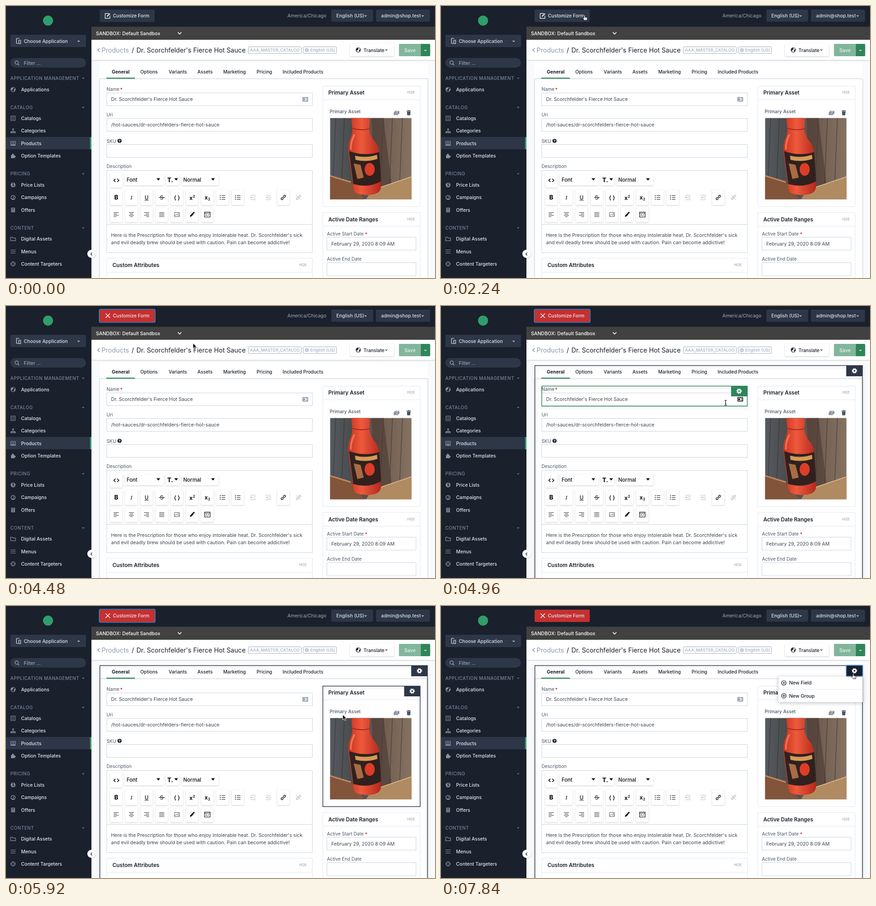
An HTML page that plays this animation: 939 by 596 pixels, repeating every 8 s.

```html
<!DOCTYPE html>
<html lang="en">
<head>
<meta charset="utf-8">
<title>Customize form</title>
<style>
html, body { margin: 0; width: 100%; height: 100%; overflow: hidden; background: #fff; }
svg { display: block; width: 939px; height: 596px; font-family: Inter, sans-serif; }
text { white-space: pre; }
.lift { filter: drop-shadow(0 1px 1.5px rgba(0,0,0,.2)); }
.float { filter: drop-shadow(0 2px 4px rgba(0,0,0,.22)); }
</style>
</head>
<body>
<svg id="stage" viewBox="0 0 939 596" xmlns="http://www.w3.org/2000/svg"></svg>
<script>
const NAVY = '#1a202c', SLATE = '#2d3748', GREEN = '#2f855a', INK = '#1a202c';
const BODY = '#3d4451', LABEL = '#4a5568', EDGE = '#cbd5e0', FAINT = '#e2e8f0', PALE = '#a0aec0';
const PRODUCT = "Dr. Scorchfelder's Fierce Hot Sauce";

const text = (x, y, s, size, fill, weight = 400, extra = '') =>
  `<text x="${x}" y="${y}" font-size="${size}" fill="${fill}" font-weight="${weight}" ${extra}>${s}</text>`;
const rect = (x, y, w, h, fill, extra = '') =>
  `<rect x="${x}" y="${y}" width="${w}" height="${h}" fill="${fill}" ${extra}/>`;
const box = (x, y, w, h, stroke, extra = '') => rect(x, y, w, h, '#fff', `stroke="${stroke}" ${extra}`);
const line = (d, stroke, w = 1, extra = '') =>
  `<path d="${d}" fill="none" stroke="${stroke}" stroke-width="${w}" ${extra}/>`;
const shape = (d, fill, extra = '') => `<path d="${d}" fill="${fill}" ${extra}/>`;
const ring = (x, y, r, stroke, w = 1, extra = '') =>
  `<circle cx="${x}" cy="${y}" r="${r}" fill="none" stroke="${stroke}" stroke-width="${w}" ${extra}/>`;
const dot = (x, y, r, fill, extra = '') => `<circle cx="${x}" cy="${y}" r="${r}" fill="${fill}" ${extra}/>`;
const at = (x, y, s) => `<g transform="translate(${x} ${y})">${s}</g>`;
const group = (id, s) => `<g id="${id}">${s}</g>`;
const chevron = (x, y, c, r = 2.2, w = 1.2) => line(`M${x - r} ${y - r / 2}l${r} ${r}l${r} ${-r}`, c, w);
const caret = (x, y) => shape(`M${x - 4} ${y - 2.5}h8l-4 5z`, '#000');
const hide = (x, y) => text(x, y, 'HIDE', 7, '#8a94a6', 400, 'letter-spacing=".15"');
const gear = (x, y, c = '#fff') => at(x, y, ring(0, 0, 3.2, c, 2.6) + ring(0, 0, 4.9, c, 1.9, 'stroke-dasharray="2 1.85"'));
const globe = (x, y, r, c) => at(x, y, ring(0, 0, r, c, 1.1) +
  shape(`M${-r} -1l${r * .6} ${-r * .7}l${r * .6} ${r * .3}l${-r * .3} ${r * .5}l${-r * .4} ${r * .3}l${r * .2} ${r * .7}z
    M${r * .3} ${r * .1}l${r * .6} ${-r * .5}v${r * .6}l${-r * .5} ${r * .6}z`, c));

const icons = c => ({
  globe: globe(0, 0, 5, c),
  book: line('M-4.5 -5h9v10h-9zM-2 -2.5h4M-2 0h4M-2 2.5h4', c, 1.2) + line('M-4.5 -3h-1M-4.5 3h-1', c),
  tree: line('M0 -2v3M-4 3v-2h8v2', c) + rect(-1.7, -5, 3.4, 3, c) +
    [-5.5, -1.5, 2.5].map(x => rect(x, 2, 3, 3, c)).join(''),
  list: line('M-5 -4.5h10v9h-10z', c, 1.2) + line('M-3 -2h6M-3 0h6', c) + rect(-4, 2, 8, 2, c),
  puzzle: rect(-4.5, -2, 8, 7, c) + dot(-.5, -3, 2, c) + dot(4, 1.5, 1.8, c),
  price: dot(0, 0, 5.2, c) + text(-2.6, 3.2, '$', 8.5, NAVY, 700),
  gauge: ring(0, 0, 4.6, c, 1.5) + line('M-.5 1l2.5 -3M-3 3.3h6', c, 1.4),
  calc: rect(-4, -5, 8, 10, c) + line('M-2.5 -2.8h5', NAVY, 1.5) + line('M-2.5 .2h5M-2.5 2.8h5', NAVY, 1.2, 'stroke-dasharray="1.2 .7"'),
  folder: line('M-5.3 -3.8h3.8l1.5 1.6h5.3v6h-10.6z', c, 1.2),
  menu: line('M-5.5 -3.5h11M-5.5 0h11M-5.5 3.5h11', c, 1.1),
  target: ring(0, 0, 4.6, c, 1.2) + line('M0 -5v3.5M0 5v-3.5M-5 0h3.5M5 0h-3.5', c, 1.3)
});

function sidebar() {
  const sections = [['APPLICATION MANAGEMENT', 158], ['CATALOG', 222], ['PRICING', 367.5], ['CONTENT', 486]];
  const rows = [['Applications', 183, 'globe'], ['Catalogs', 246, 'book'], ['Categories', 273.5, 'tree'],
    ['Products', 301, 'list'], ['Option Templates', 328.5, 'puzzle'], ['Price Lists', 392, 'price'],
    ['Campaigns', 419.5, 'gauge'], ['Offers', 447, 'calc'], ['Digital Assets', 510.5, 'folder'],
    ['Menus', 538, 'menu'], ['Content Targeters', 565, 'target']];
  const set = icons('#8592a6');
  return rect(0, 0, 187, 596, NAVY) + dot(92, 32, 11, '#2f9e6b') +
    rect(9.5, 63, 165.5, 27, SLATE, 'rx="2"') +
    line('M29 71h-6v11h4', '#e2e8f0', 1.2) + line('M28 75h4v7.500h-4z', '#e2e8f0', 1.2) +
    text(39, 80.6, 'Choose Application', 10.3, '#dbe2ea', 500) + chevron(159, 77, '#e2e8f0') +
    rect(9.5, 114, 165.5, 21, SLATE, 'rx="10.5"') + ring(23.3, 124, 3.7, PALE, 1.2) + line('M26 127l3 3', PALE, 1.3) +
    text(39, 128.5, 'Filter ...', 10.5, '#a9b5c5') +
    rect(0, 287, 187, 27, SLATE) + rect(184, 287, 3, 27, '#38a169') +
    sections.map(([s, y]) => text(9.5, y + 3.8, s, 9.85, '#76859a', 500, 'letter-spacing=".5"') + chevron(169, y, '#76859a')).join('') +
    rows.map(([s, y, k]) => at(15.5, y, set[k]) + text(33, y + 3.8, s, 10.4, '#e2e8f0', 500)).join('');
}

function topBar() {
  return rect(187, 0, 752, 45, NAVY) +
    text(616, 25, 'America/Chicago', 10.4, '#a0abbb') +
    rect(712, 8, 91.500, 26.500, SLATE, 'rx="2"') + text(723, 25, 'English (US)', 10.45, '#dbe2ea', 500) + chevron(787, 21.500, '#e2e8f0') +
    rect(810, 8, 118, 26.500, SLATE, 'rx="2"') + text(821, 25, 'admin@shop.test', 10.4, '#dbe2ea', 500) + chevron(912, 21.500, '#e2e8f0') +
    rect(187, 45, 752, 29, '#414141') + rect(187, 45, 752, 1, '#333') +
    text(197, 63.600, 'SANDBOX: Default Sandbox', 10.5, '#fff', 500) + chevron(380, 59.500, '#fff', 4, 1.7);
}

function titleBar() {
  return rect(187, 74, 752, 44, '#fff', 'class="lift"') +
    line('M205 92.500l-4 4l4 4', '#8794a8', 1.6) + text(209, 101.5, 'Products', 14.3, '#8e9bb0') +
    text(275, 101.5, '/', 14.2, INK) + text(285.5, 101.5, PRODUCT, 14.15, INK, 400) +
    box(530.5, 89.500, 116, 14.500, PALE, 'rx="2"') + text(534, 100.2, 'AAA_MASTER_CATALOG', 9.15, PALE, 500) +
    box(650.5, 89.500, 73, 14.500, PALE, 'rx="2"') + ring(658.5, 96.700, 3.8, PALE) +
    line('M655 96.700h7M658.500 93v7.500M657 93.500q-1.500 3 0 6.500M660 93.500q1.500 3 0 6.500', PALE, .7) +
    text(666, 100.2, 'English (US)', 9.3, PALE, 500) +
    rect(753, 83, 96, 27, '#fff', 'rx="2" class="lift"') + globe(771, 96.300, 5, INK) +
    text(782.5, 100.5, 'Translate', 10.4, INK, 500) + chevron(832.500, 96.300, INK) +
    rect(860.5, 83, 68, 27, GREEN, 'rx="2"') + rect(860.5, 83, 47.500, 27, '#82b69c') +
    text(872, 100.600, 'Save', 10.5, '#e6f2eb', 500) + chevron(918, 97, '#fff');
}

const field = (x, y, w, h, s = '') => box(x, y, w, h, EDGE) + text(x + 9.5, y + h / 2 + 3.8, s, 10.6, BODY);
const tool = (x, y, w, h) => rect(x, y, w, h, '#fff', 'rx="1" class="lift"');

function lines(widths, shift) {
  return line(widths.map((w, i) => `M${shift(w)} ${-4.5 + i * 3}h${w}`).join(''), '#333', 1.1);
}

function toolbar() {
  const K = '#111', G = '#b9bec6';
  const bullets = c => line('M-2 -4h8M-2 0h8M-2 4h8', c, 1.1);
  const indent = d => line('M-6 -5h12M0 -1.700h6M0 1.700h6M-6 5h12', G, 1.1) + shape(`M${-3 - d * 2} -2.500v5l${d * 4} -2.500z`, G);
  const chain = c => `<g transform="rotate(-45)">` + line('M-1 -2h-3a2 2 0 0 0 0 4h3M1 -2h3a2 2 0 0 1 0 4h-3M-2.500 0h5', c, 1.3) + '</g>';
  const mid = (s, size, weight = 400, extra = '') => text(0, 4.5, s, size, K, weight, 'text-anchor="middle" ' + extra);
  const row2 = [
    mid('B', 13, 800), mid('I', 13, 500, 'font-style="italic" font-family="Liberation Serif, serif"'),
    mid('U', 11.5, 500) + line('M-4.500 6h9', K), mid('S', 12) + line('M-6 0h12', K, 1.2),
    mid('{ }', 11.5, 600), text(-6, 5, 'x', 12, K, 700) + text(1.5, 0, '2', 7.5, K, 700),
    text(-6, 4, 'x', 12, K, 700) + text(1.5, 6, '2', 7.5, K, 700),
    bullets(K) + [-4, 0, 4].map(y => dot(-5, y, 1, K)).join(''),
    bullets(K) + line('M-5 -5.500v3M-5 -1.500v3M-5 2.500v3', K),
    indent(1), indent(-1), chain(K), chain(G) + line('M-5 -5l10 10', G)
  ];
  const row3 = [
    lines([11, 7, 11, 6], () => -5.5), lines([11, 7, 11, 6], w => -w / 2), lines([11, 7, 11, 6], w => 5.5 - w),
    lines([11, 11, 11, 11], () => -5.5),
    line('M-5.500 -4.500h11v9h-11zM-5 3l3.500 -4l2.500 3l2 -2l2.500 3', '#555') + dot(2.5, -2, 1, '#555'),
    shape('M-5 5l1 -3.500l4 -4l2.500 2.500l-4 4z', K) + line('M1 -1.500l3 -3', K, 3, 'stroke-linecap="round"'),
    line('M-6 -5.500h12v11h-12zM-6 -3h12', K, 1.2) + line('M-3.500 3l2 -4M-1 3h1.500M1.500 2.500l1.500 -3', K)
  ];
  const key = (s, i, y) => {
    const x = 241.2 + i * 33.25, off = [9, 10, 12].includes(i) && y < 430;
    return (off ? '' : tool(x - 13.5, y - 16.5, 27, 33)) + at(x, y, s);
  };
  return box(220.5, 360.5, 450, 180, EDGE) + line('M220 478.500h450', EDGE) +
    tool(228, 366, 27, 32) + line('M239.500 378.500l-3.500 3.500l3.500 3.500M243.500 378.500l3.500 3.500l-3.500 3.500', K, 1.7) +
    tool(260, 369, 85, 24) + text(264, 385, 'Font', 11.3, K, 500) + caret(333.5, 380) +
    tool(350, 369, 29, 24) + text(353, 386, 'T.', 13, K, 800) + caret(372.5, 380) +
    tool(384, 369, 81, 24) + text(388, 385, 'Normal', 11.3, K, 500) + caret(453, 380) +
    row2.map((s, i) => key(s, i, 419.5)).join('') + row3.map((s, i) => key(s, i, 457)).join('') +
    text(230, 506, "Here is the Prescription for those who enjoy intolerable heat. Dr. Scorchfelder's sick", 10.6, BODY) +
    text(230, 521.5, 'and evil deadly brew should be used with caution. Pain can become addictive!', 10.6, BODY);
}

function photo() {
  const planks = [722, 741, 826, 846, 868].map(x => line(`M${x} 240L${x - 8} 425`, '#332c29', 1.5, 'opacity=".55"')).join('');
  return `<g clip-path="url(#frame)">` + rect(709, 245, 180, 180, 'url(#wood)') + planks +
    shape('M800 245h26l22 178h-40z', '#4b3b34', 'opacity=".6"') +
    shape('M709 372l46 14l30 38h-76z', '#82543a') + shape('M709 372l46 14', 'none', 'stroke="#c08a5e" stroke-width="3"') +
    shape('M788 424l12 -20l88 -30v50z', '#b08a60') + line('M800 404l88 -30', '#d5b384', 2) +
    shape('M756 245h40q1 12 -1 25q2 16 13 28q8 9 9 24l4 72q0 14 -14 18q-20 5 -38 -1q-8 -3 -9 -14l-10 -75q-3 -18 4 -32q6 -14 3 -30z', 'url(#sauce)') +
    line('M758 268q19 6 37 1', '#a92a20', 2) +
    line('M762 283q-8 16 -7 30', '#f68a68', 4, 'opacity=".7" stroke-linecap="round"') +
    shape('M751 318q33 12 66 2l4 64q-28 16 -61 6z', '#30211f') +
    shape('M764 328q24 6 48 -2l1 9q-24 8 -48 2z', '#d49b58') +
    shape('M761 345l15 3l7 28l-14 3z', '#a96b43') +
    `<ellipse cx="796" cy="358" rx="11" ry="14" fill="#dc3d27"/>` + '</g>';
}

function page() {
  const tabs = [['General', 231.5], ['Options', 294], ['Variants', 356], ['Assets', 419], ['Marketing', 475.5],
    ['Pricing', 548.5], ['Included Products', 605.5]];
  const star = (x, y) => text(x, y, '*', 10.5, '#c53030', 600);
  return rect(187, 118, 752, 478, '#f9fafb') + rect(205, 123, 718, 480, '#fff') +
    `<g class="lift">` + box(205.5, 159.5, 717, 460, FAINT) + '</g>' + line('M205 159.500h718', EDGE) +
    group('outline', rect(205.5, 130.500, 717, 480, 'none', `stroke="${SLATE}" stroke-width="1.4" class="float"`)) +
    rect(219.5, 157, 62.500, 2.2, GREEN) +
    tabs.map(([s, x], i) => text(x, 148, s, 10.25, INK, i ? 500 : 700)).join('') +
    text(220, 185.500, 'Name', 10.2, LABEL) + star(249.5, 186.500) + field(220.5, 190.500, 450, 28, PRODUCT) +
    group('card', line('M649.500 200.500h11v8h-11z', 'currentColor', 1.3) + rect(651, 202.500, 3, 4, 'currentColor') +
      line('M655.500 203h4M655.500 206h4', 'currentColor', 1.1)) +
    text(220, 242, 'Uri', 10.2, LABEL) + field(220.5, 246.500, 450, 28, '/hot-sauces/dr-scorchfelders-fierce-hot-sauce') +
    text(220, 299.500, 'SKU', 10.2, LABEL) + dot(248.5, 295.500, 4.6, INK) + text(246.2, 298.500, '?', 8, '#fff', 700) +
    field(220.5, 303.500, 450, 28) + text(220, 355, 'Description', 10.15, LABEL) + toolbar() +
    box(220.5, 552.500, 450, 60, FAINT) + line('M220 583.500h450', FAINT) +
    text(233, 572.300, 'Custom Attributes', 11.7, INK, 600) + hide(641.5, 570.300) +
    box(693.5, 175.500, 213, 264, FAINT, 'id="asset"') + line('M694 205.500h212', FAINT) +
    text(705.5, 194.300, 'Primary Asset', 11.65, INK, 600) + group('assetHide', hide(878, 192.300)) +
    text(708.5, 234.500, 'Primary Asset', 10.15, LABEL, 500) +
    line('M851.500 230.500h8.500v5.500h-8.500zM849.500 232.500v5.700h8.500M852 235l2.500 -2.500l2 2l1.500 -1.500l2 2', LABEL, 1.2) +
    shape('M877.500 231h8l-.7 8.500h-6.600zM876.500 229h3l.7 -1h2.600l.7 1h3v1.200h-10z', LABEL) + photo() +
    box(693.5, 452.500, 213, 160, FAINT) + line('M694 482.500h212', FAINT) +
    text(705.5, 471.600, 'Active Date Ranges', 11.6, INK, 600) + hide(878, 469.600) +
    text(702.5, 502.500, 'Active Start Date', 10.1, LABEL) + star(785.5, 503.500) +
    field(702.5, 506.500, 195, 28.500, 'February 29, 2020 8:09 AM') +
    text(702.5, 558, 'Active End Date', 10.1, LABEL) + field(702.5, 562.500, 195, 28.500);
}

function overlays() {
  const plus = y => ring(750.5, y, 5, INK, 1.2) + line(`M747.500 ${y}h6M750.500 ${y - 3}v6`, INK, 1.2);
  return group('nameHover', rect(220.5, 175.500, 450, 44, 'none', `stroke="${GREEN}" stroke-width="1.4" class="float"`) +
      rect(635, 175, 36, 23, GREEN) + gear(652.5, 186.500)) +
    group('assetHover', rect(693.5, 175.500, 213, 264, 'none', `stroke="${SLATE}" stroke-width="1.4" class="float"`) +
      rect(871.5, 175, 35.500, 23, SLATE) + gear(889, 186.500)) +
    group('panelGear', rect(887, 130, 36, 24, SLATE, 'id="gearBox"') + gear(905, 142)) +
    group('menu', rect(738.5, 154, 184, 56.500, '#fff', `stroke="${FAINT}" class="float"`) + line('M739 182.500h183', FAINT) +
      plus(168.5) + text(762, 172.400, 'New Field', 10.4, INK, 500) + plus(196.8) + text(762, 200.700, 'New Group', 10.4, INK, 500) +
      rect(887, 130, 36, 24, 'none', 'rx="2" stroke="#4a8fd6" stroke-width="1.8"')) +
    rect(205, 8, 120.500, 27, SLATE, 'id="button" rx="2"') +
    group('edit', line('M225 16.500h-8v10.500h10.500v-6', '#e2e8f0', 1.3) + line('M221 23l6.500 -6.500', '#e2e8f0', 2.4)) +
    group('cross', line('M218 16.500l9.500 9.500M227.500 16.500l-9.500 9.500', '#fff', 1.4)) +
    text(234, 25, 'Customize Form', 10.25, '#e8edf3', 500) +
    group('focus', rect(204.2, 7, 122.200, 29, 'none', 'rx="3" stroke="#3f83c9" stroke-width="1.7"')) +
    `<g class="lift">` + dot(187, 543, 9, '#fff') + '</g>' + line('M188.500 540.500l-3 3l3 3', INK, 1.4);
}

function cursors() {
  return group('cursor',
    group('arrow', shape('M0 0v11.500l2.700 -2.500l1.700 4l2 -.8l-1.700 -3.900h3.700z', '#000', 'stroke="#fff" stroke-width=".9"')) +
    group('hand', shape('M-1 1q0 -1.500 1 -1.500t1.200 1.500v3.500l4 .8q1.500 .4 1.300 2l-.8 4.200h-5.700l-3.500 -4.500q-.3 -1.500 1 -1.300l1.500 1z', '#fff', 'stroke="#111" stroke-width="1"') +
      line('M2 7.500v2M4 7.500v2', '#111', .7)) +
    group('beam', line('M-2.500 -5.500q2.500 0 2.500 1.500q0 -1.500 2.500 -1.500M0 -4v8M-2.500 5.500q2.500 0 2.500 -1.500q0 1.500 2.500 1.500M-1.200 1.500h2.400', '#000', 1.1)));
}

const stage = document.getElementById('stage');
stage.innerHTML = `<defs>
  <clipPath id="frame"><rect x="709.5" y="245.500" width="178" height="178"/></clipPath>
  <linearGradient id="wood"><stop offset="0" stop-color="#555a5f"/><stop offset=".3" stop-color="#4a4a4b"/>
    <stop offset=".6" stop-color="#6d5a4e"/><stop offset="1" stop-color="#857363"/></linearGradient>
  <linearGradient id="sauce"><stop offset="0" stop-color="#c8321f"/><stop offset=".4" stop-color="#ee5a3c"/>
    <stop offset="1" stop-color="#b3271d"/></linearGradient></defs>` +
  page() + titleBar() + topBar() + sidebar() + overlays() + cursors();

const el = {};
stage.querySelectorAll('[id]').forEach(n => el[n.id] = n);
const show = (id, on) => el[id].setAttribute('display', on ? 'inline' : 'none');

// pointer path: time, x, y
const path = [[320, 817, 482], [480, 546, 302], [800, 546, 302], [1440, 346, 17], [1920, 346, 17], [2240, 314, 20],
  [2560, 295, 22], [3840, 295, 22], [4160, 338, 38], [4320, 338, 38], [4960, 623, 212], [5440, 655, 214],
  [5920, 737, 238], [6560, 831, 160], [6880, 903, 143], [7680, 903, 143], [7840, 902, 148]];
const inputs = [[220, 190, 671, 219], [220, 246, 671, 275], [220, 303, 671, 332], [220, 478, 671, 541]];
const inside = ([x, y], [l, t, r, b]) => x >= l && x <= r && y >= t && y <= b;

function pointer(t) {
  const i = path.findIndex(k => k[0] > t);
  if (i < 0) return path[path.length - 1].slice(1);
  if (i === 0) return path[0].slice(1);
  const [a, b] = [path[i - 1], path[i]], p = (t - a[0]) / (b[0] - a[0]);
  return [a[1] + (b[1] - a[1]) * p, a[2] + (b[2] - a[2]) * p];
}

function draw(ms) {
  const t = Math.floor(ms % 8000 / 160) * 160, p = pointer(t);
  const active = t >= 3200, open = t >= 7360;
  const onButton = inside(p, [205, 8, 325, 35]), onGear = inside(p, [887, 130, 923, 154]);
  const onName = active && inside(p, [220, 175, 671, 220]);
  const onAsset = active && inside(p, [693, 175, 907, 440]);
  const onPanel = active && inside(p, [205, 130, 923, 596]);
  const hot = onButton && t >= 2400;

  el.button.setAttribute('fill', active ? (hot ? '#e03c40' : '#c53030') : hot ? '#4a5568' : SLATE);
  el.gearBox.setAttribute('fill', onGear ? NAVY : SLATE);
  el.card.setAttribute('color', onName ? '#000' : '#718096');
  show('edit', !active);
  show('cross', active);
  show('focus', active && !open);
  show('outline', onPanel);
  show('panelGear', onPanel);
  show('nameHover', onName);
  show('assetHover', onAsset);
  show('assetHide', !onAsset);
  show('menu', open);

  const onInput = inputs.some(r => inside(p, r)), onHand = onButton || (active && onGear);
  show('cursor', t >= 320);
  show('hand', onHand);
  show('beam', !onHand && onInput);
  show('arrow', !onHand && !onInput);
  el.cursor.setAttribute('transform', `translate(${p[0]} ${p[1]})`);
}

const start = performance.now();
function tick(now) {
  draw(Math.max(0, now - start));
  requestAnimationFrame(tick);
}
draw(0);
requestAnimationFrame(tick);
</script>
</body>
</html>
```
